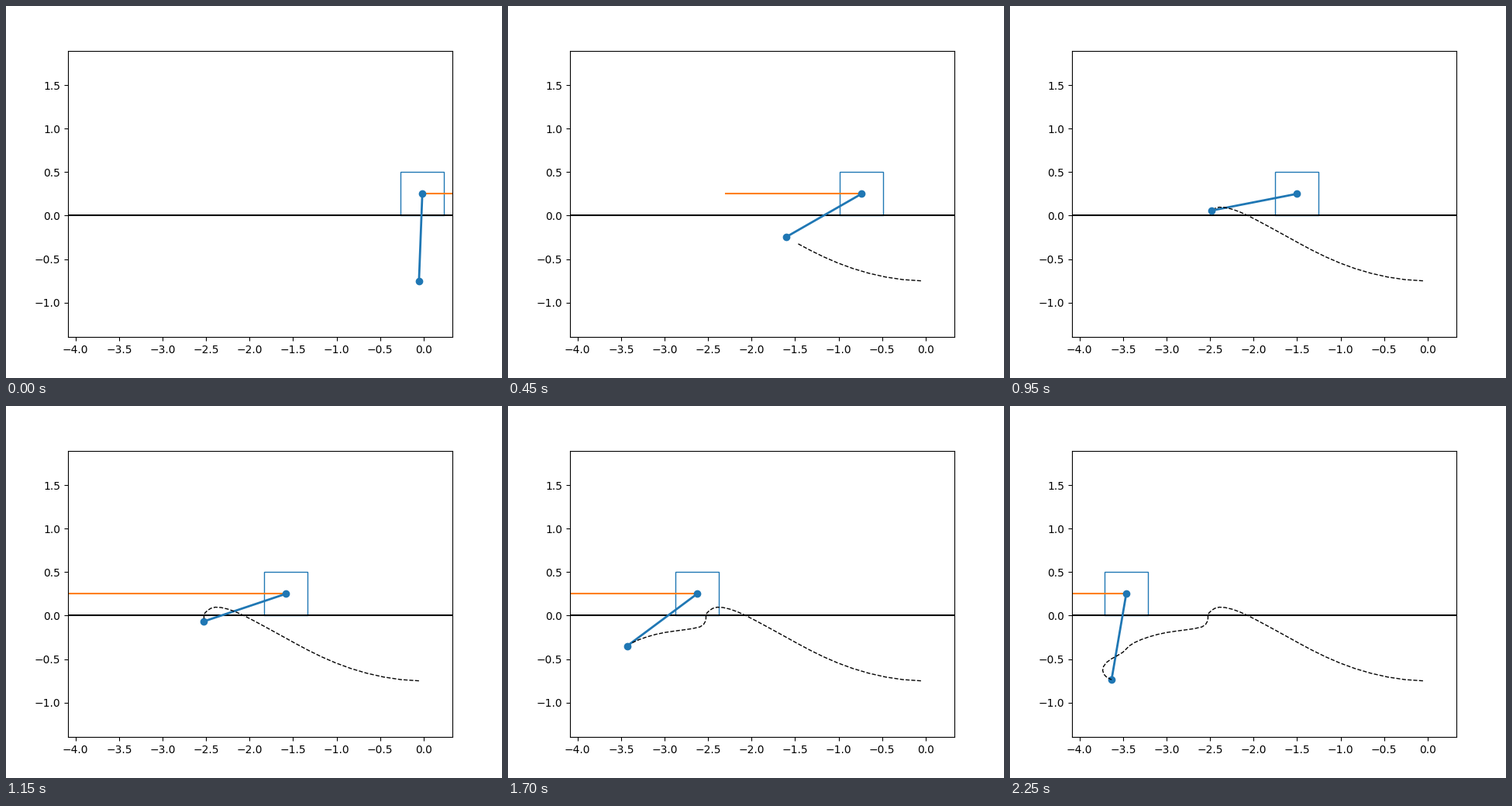
Animation, 640 px wide and 480 px high, one loop 3500 ms. Source, as a matplotlib script:

```python
import numpy as np
import matplotlib.pyplot as plt
from matplotlib.animation import FuncAnimation

LENGTH = 1.0         # pole length
SIZE = 0.5           # cart side
PIVOT = SIZE / 2     # pivot height
SCALE = 112.3        # pixels per unit
LEFT = -4.086        # left end of the view
STEPS = 45           # moving steps; the last pose is then held
FRAMES, STEP_MS = 70, 50


def glide(keys):
    """Smooth cubic path through {step: value} key poses."""
    t, v = np.array(list(keys.items()), float).T
    slope = np.gradient(v, t, edge_order=2)
    x = np.arange(STEPS)
    k = np.clip(np.searchsorted(t, x, side="right") - 1, 0, len(t) - 2)
    h = t[k + 1] - t[k]
    u = (x - t[k]) / h
    start = v[k] * (1 + 2 * u) + slope[k] * h * u
    end = v[k + 1] * (3 - 2 * u) + slope[k + 1] * h * (u - 1)
    return start * (1 - u) ** 2 + end * u ** 2


cart = glide({0: -0.015, 9: -0.737, 13: -1.097, 17: -1.406, 20: -1.537,
              23: -1.584, 25: -1.667, 27: -1.878, 34: -2.626, 36: -2.761,
              39: -3.08, 41: -3.258, 44: -3.463})
angle = np.radians(glide({0: 2.2, 4: 30.9, 9: 60.2, 17: 81.2, 20: 77.3,
                          25: 67.7, 30: 62.2, 34: 53.3, 41: 28.4, 44: 9.7}))
tip_x = cart - LENGTH * np.sin(angle)
tip_y = PIVOT - LENGTH * np.cos(angle)

# Control force on the cart, switched on for short spells.
force = np.zeros(STEPS)
for start, stop, push in [(0, 2, 5), (8, 10, -1.56), (21, 26, -5), (26, 29, 5),
                          (33, 35, -5), (36, 39, 5), (43, 45, -5)]:
    force[start:stop] = push

fig, ax = plt.subplots(figsize=(6.4, 4.8), dpi=100)
width, height = 496 / SCALE, 369.6 / SCALE
ax.set_xlim(LEFT, LEFT + width)
ax.set_ylim(PIVOT - height / 2, PIVOT + height / 2)

ax.axhline(0, color="k", lw=1.5)
box = ax.add_patch(plt.Rectangle((0, 0), SIZE, SIZE, fill=False, ec="C0", lw=1))
arrow, = ax.plot([], [], color="C1", lw=1.5)
pole, = ax.plot([], [], "o-", color="C0", lw=2)
trail, = ax.plot([], [], "k--", lw=1)


def update(frame):
    i = min(frame, STEPS - 1)
    x = cart[i]
    box.set_x(x - SIZE / 2)
    pole.set_data([x, tip_x[i]], [PIVOT, tip_y[i]])
    arrow.set_data([x, x + force[i]], [PIVOT, PIVOT])
    arrow.set_visible(bool(force[i]))
    trail.set_data(tip_x[:frame], tip_y[:frame])
    return box, arrow, pole, trail


anim = FuncAnimation(fig, update, frames=FRAMES, interval=STEP_MS,
                     repeat=True, repeat_delay=0)
plt.show()
```
